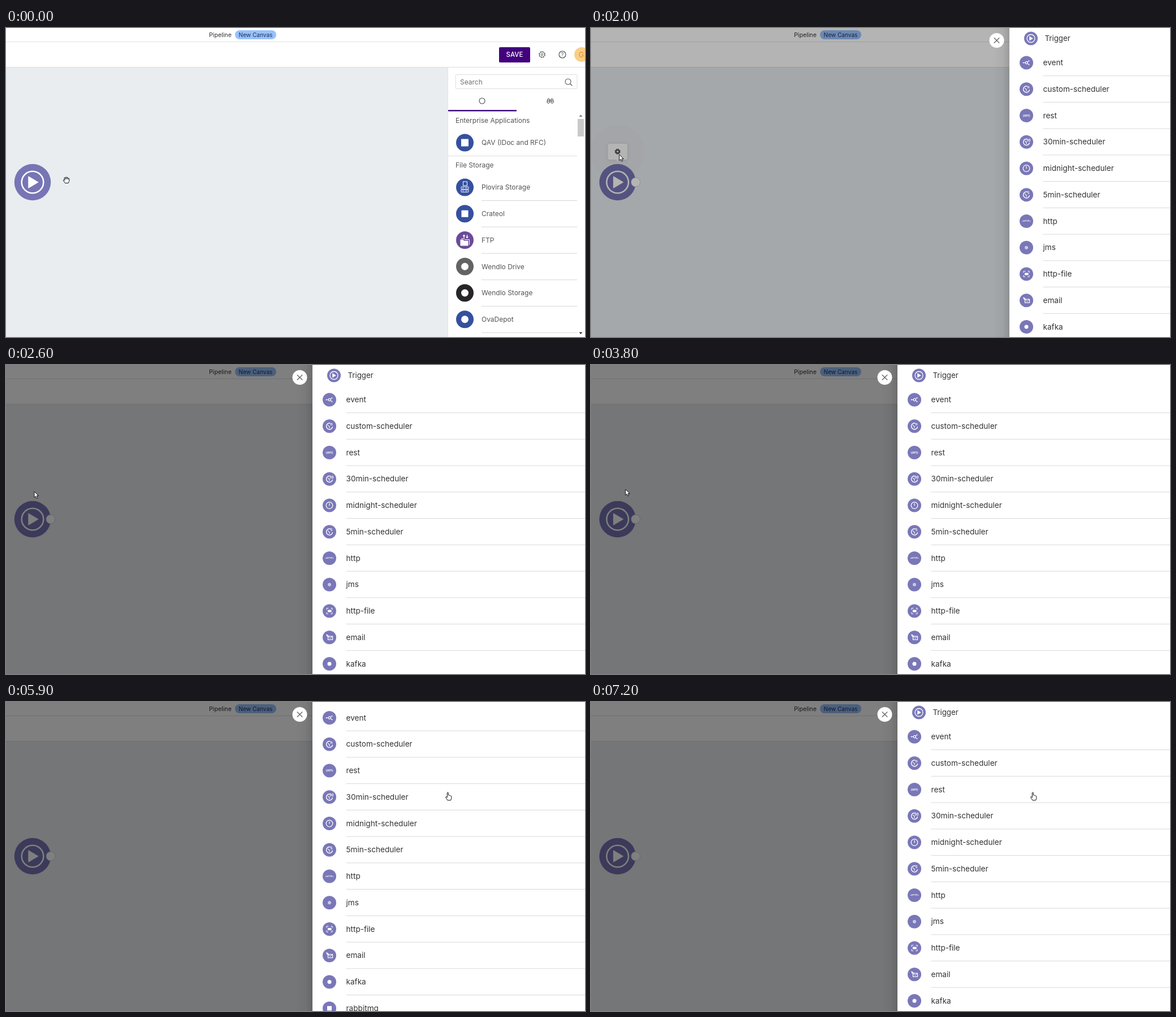
Animation, 1024 px wide and 547 px high, one loop 8 s. Source, as an HTML page:

```html
<!DOCTYPE html>
<html lang="en">
<head>
<meta charset="utf-8">
<title>Pipeline canvas</title>
<style>
  html, body { margin: 0; width: 100%; height: 100%; overflow: hidden; background: #fff; }
  svg { display: block; width: 100%; height: 100%; font-family: Inter, "Open Sans", sans-serif; }
</style>
</head>
<body>
<svg id="stage" viewBox="0 0 1024 547"></svg>
<script>
const LOOP = 8000, STEP = 100, PITCH = 46.75, WIDTH = 1024, DOCK = 542;
const BLUE = '#36509f', VIOLET = '#7a77b8';

const text = (x, y, size, fill, str, extra = '') =>
  `<text x="${x}" y="${y}" font-size="${size}" fill="${fill}" ${extra}>${str}</text>`;
const rect = (x, y, w, h, fill, extra = '') =>
  `<rect x="${x}" y="${y}" width="${w}" height="${h}" fill="${fill}" ${extra}/>`;
const disc = (x, y, r, fill, extra = '') =>
  `<circle cx="${x}" cy="${y}" r="${r}" fill="${fill}" ${extra}/>`;
const line = (d, color = '#fff', w = 1.2) =>
  `<path d="${d}" fill="none" stroke="${color}" stroke-width="${w}" stroke-linecap="round" stroke-linejoin="round"/>`;
const shape = (d, fill = '#fff') => `<path d="${d}" fill="${fill}"/>`;
const group = (x, y, body, id = '') =>
  `<g ${id && `id="${id}"`} transform="translate(${x} ${y})">${body}</g>`;
const center = 'text-anchor="middle"';

function gear(r, color, w) {
  const tooth = 2 * Math.PI * r / 16;
  return disc(0, 0, r * .6, 'none', `stroke="${color}" stroke-width="${w}"`) +
    disc(0, 0, r * .9, 'none', `stroke="${color}" stroke-width="${r * .3}" stroke-dasharray="${tooth * .9}"`);
}

const play = (r, ring) => disc(0, 0, r, 'none', `stroke="#fff" stroke-width="${ring}"`) +
  `<path d="M${-r * .37} ${-r * .52}V${r * .52}L${r * .5} 0Z" fill="#fff" stroke="#fff" stroke-width="${r * .06}" stroke-linejoin="round"/>`;

const clock = label =>
  line('M1 -5.2A5.5 5.5 0 1 0 5.4 1.5', '#fff', 1.4) + line('M-2.6 -1.6L0 .6V3') +
  text(3.7, -1.2, 6, '#fff', label, `${center} font-weight="700"`);
const tiny = (str, size) => text(0, size * .36, size, '#fff', str, `${center} font-weight="700"`);

const storageIcon = rect(-3, -10, 7, 7, 'none', 'stroke="#fff"') +
  [0, 5].map(y => rect(-6.5, y - 1, 13, 4.5, 'none', 'stroke="#fff" rx="1"') + line(`M-4 ${y + 1.2}h2M1 ${y + 1.2}h3`, '#fff', .9)).join('');
const ftpIcon = shape('M-8 -1h5l1.500 2H6V10H-8Z') + line('M-6 -2.5h5l1 1.500H8V8', '#fff', 1) +
  line('M-1.500 -4V-9M-3 -7.500L-1.500 -9L0 -7.500M4 -9V-4M2.500 -5.500L4 -4L5.500 -5.500', '#fff', 1.3);

const apps = [
  ['QAV (IDoc and RFC)', BLUE, rect(-6.5, -6.5, 13, 13, '#fff')],
  ['Plovira Storage', BLUE, storageIcon],
  ['Crateol', BLUE, rect(-6, -6, 12, 12, '#fff')],
  ['FTP', '#6c4a98', ftpIcon],
  ['Wendlo Drive', '#636363', disc(0, 0, 6.5, '#fff')],
  ['Wendlo Storage', '#272528', disc(0, 0, 6.5, '#fff')],
  ['OvaDepot', BLUE, disc(0, 0, 6.5, '#fff')]
];

const triggers = [
  ['event', line('M-6 0H-2M2 -1.300L4.300 -3M2 1.300L4.300 3', '#fff', 1) +
    disc(.3, 0, 2.1, 'none', 'stroke="#fff" stroke-width="1.1"') +
    disc(4.5, -3.2, 1, '#fff') + disc(4.5, 3.2, 1, '#fff') + disc(-5, 0, .9, '#fff')],
  ['custom-scheduler', clock('n')],
  ['rest', tiny('{API}', 5)],
  ['30min-scheduler', clock('30')],
  ['midnight-scheduler', disc(0, 0, 5.8, 'none', 'stroke="#fff" stroke-width="1.3"') + line('M0 -3.500V.5')],
  ['5min-scheduler', clock('5')],
  ['http', tiny('&lt;HTTP&gt;', 3.8)],
  ['jms', disc(0, 0, 3, '#fff', 'opacity=".6"')],
  ['http-file', line('M-5 -2.500V-5H-2M3 -5H5V-2.500M5 2.500V5H2.500M-2.500 5H-5V2.500', '#fff', 1) + rect(-3, -2, 6.5, 4, '#fff')],
  ['email', shape('M-6 -6L-1 -3.500L-3 -2.700L-4 -.5Z') + rect(-2.5, -2, 8, 6, 'none', 'stroke="#fff" stroke-width="1.2"') + line('M-2 -1.500L1.500 1.500L5 -1.500', '#fff', 1)],
  ['kafka', disc(0, 0, 3.5, '#fff')],
  ['rabbitmq', rect(-4, -4, 8, 8, '#fff')]
];

function header() {
  return rect(0, 0, WIDTH, 70, '#fff') + rect(0, 24, WIDTH, 1, '#e2e2e2') + rect(0, 69, WIDTH, 1, '#dcdcdc') +
    text(359, 16, 10.7, '#333', 'Pipeline') +
    rect(405, 4, 73, 16, '#98c1fc', 'rx="8"') + text(441.5, 16, 10.1, '#1f3157', 'New Canvas', center) +
    rect(872, 34, 55, 27, '#43017d', 'rx="2"') + text(899.5, 51.2, 11.5, '#fff', 'SAVE', `${center} font-weight="500"`) +
    group(948, 47, disc(0, 0, 4.6, 'none', 'stroke="#555" stroke-width="1"') + disc(0, 0, 1.8, 'none', 'stroke="#555"') +
      disc(0, 0, 5.3, 'none', 'stroke="#555" stroke-width="1.2" stroke-dasharray="2.08"')) +
    disc(984, 47, 6, 'none', 'stroke="#444" stroke-width="1.1"') + text(984, 50.4, 9, '#444', '?', center) +
    disc(1018, 47, 13, '#f9cf87') + text(1017.5, 51.5, 12.5, '#e08a2c', 'G', center);
}

function sidebar() {
  const row = ([name, color, icon], y) =>
    group(811.5, y, disc(0, 0, 15.5, color) + icon) + text(841, y + 4.3, 12, '#555', name);
  const files = apps.slice(1).map((app, i) => {
    const y = 282 + i * PITCH;
    return row(app, y) + rect(841, y + 23, 169, 1, '#d6d6d6');
  }).join('');
  return rect(781, 70, 243, 477, '#fff') + rect(781, 70, 1, 477, '#e4e6e8') +
    rect(795, 82.5, 215, 25, '#fff', 'stroke="#dedede" rx="2"') + text(803, 99.6, 12, '#707070', 'Search') +
    line('M998 99L1001 102', '#555', 1.1) + disc(994, 95, 5, 'none', 'stroke="#555" stroke-width="1.1"') +
    disc(842, 129, 5, 'none', 'stroke="#444" stroke-width="1.1"') +
    disc(959.2, 131, 2.2, 'none', 'stroke="#444"') + disc(965.8, 131, 2.2, 'none', 'stroke="#444"') +
    line('M957 130.500L958 125.500H961V131M968 130.500L967 125.500H964V131M961 128H964', '#444', 1) +
    rect(782, 145, 121, 2.5, '#3f0c7a') +
    text(795, 168, 12, '#555', 'Enterprise Applications') + row(apps[0], 203) +
    rect(782, 226, 228, 1, '#dedede') + text(795, 247.3, 12, '#555', 'File Storage') + files +
    rect(1011, 161, 11, 31, '#c9c9c9') +
    shape('M1013.500 157L1016.500 153.500L1019.500 157Z', '#777') + shape('M1013.500 538.500L1016.500 542L1019.500 538.500Z', '#333');
}

function node() {
  return disc(47, 219, 35, '#000', 'id="ripple"') +
    group(47, 273, disc(0, 0, 32.3, '#7775b5') + play(19.3, 2.6)) +
    disc(79, 273, 8, '#fff', 'id="port" stroke="#c8c8cc" stroke-width=".8"') +
    `<g id="popup"><path d="M43 232L47 237.500L51 232Z" fill="#fff"/>` +
    rect(30, 205, 34, 28, '#fff', 'rx="3" filter="url(#soft)"') +
    disc(47, 219, 9.7, '#e6e6e6', 'id="hover"') + group(47, 218.7, gear(4.9, '#555', 2.7)) + '</g>';
}

function panel() {
  const rows = triggers.map(([name, icon], i) => {
    const y = 61.5 + i * PITCH;
    return group(30, y, disc(0, 0, 12, VIOLET) + icon) + text(59.5, y + 4.7, 13.6, '#333', name) +
      rect(59.5, y + 22.6, 430, 1, '#d9d9d9');
  }).join('');
  const list = group(38, 18.5, disc(0, 0, 12, VIOLET) + play(7, 1.3)) + text(62.5, 23.3, 13.3, '#333', 'Trigger') + rows;
  return rect(-30, 0, 30, 547, 'url(#edge)') + rect(0, 0, 490, 547, '#fff') + group(0, 0, list, 'list') +
    group(-22.5, 22, disc(0, 0, 13, '#fff') + line('M-4.300 -4.300L4.300 4.300M4.300 -4.300L-4.300 4.300', '#666', 1.3));
}

const outlined = d => `<path d="${d}" fill="#fff" stroke="#111" stroke-width="1" stroke-linejoin="round"/>`;
const cursors = {
  grab: outlined('M3.500 11.500L.5 7Q0 5.500 1.500 5.500L3 7L2 2.500Q2.500 1 3.700 2L4.500 4.500V1.300Q5.500 0 6.500 1.300V4.500L7.200 1.800Q8.500 1 9 2.300V5L9.700 3.500Q11 3 11 4.500L10.500 8.500L9.200 11.500Z'),
  arrow: outlined('M0 0V10.500L2.500 8.300L4.200 12L6 11.200L4.400 7.600H7.600Z'),
  point: outlined('M4 15L1 10.500Q0 8.500 1.500 8.500L3.300 10V1.500Q4.300 0 5.300 1.500V6Q6.500 5.300 7.300 6.500Q8.700 6 9.200 7.200Q10.800 7 10.800 8.500V11.500L9.500 15Z')
};

const stage = document.getElementById('stage');
stage.innerHTML = `<defs>
  <filter id="soft" x="-50%" y="-50%" width="200%" height="200%"><feDropShadow dx="0" dy="1" stdDeviation="3" flood-opacity=".1"/></filter>
  <linearGradient id="edge"><stop stop-opacity="0"/><stop offset=".6" stop-opacity=".04"/><stop offset="1" stop-opacity=".14"/></linearGradient>
  </defs>` + rect(0, 0, WIDTH, 547, '#e9edf0') + node() + header() + sidebar() +
  rect(0, 0, WIDTH, 547, '#000', 'id="shade"') + group(0, 0, panel(), 'panel') +
  group(0, 0, Object.entries(cursors).map(([k, body]) => group(0, 0, body, k)).join(''), 'cursor');

const $ = id => document.getElementById(id);
const set = (id, attrs) => { for (const k in attrs) $(id).setAttribute(k, attrs[k]); };
const move = (id, x, y) => set(id, { transform: `translate(${x} ${y})` });

// Last value whose time has come.
const held = (track, t) => track.reduce((v, [at, value]) => t >= at ? value : v, 0);

const path = [
  [0, 101, 263], [200, 84, 260], [300, 66, 253], [500, 47, 238], [600, 47, 238], [1200, 50, 224],
  [3700, 50, 224], [3800, 61, 220], [4000, 190, 165], [4200, 420, 104], [4300, 550, 95],
  [4400, 655, 112], [4500, 718, 135], [4600, 718, 135], [4800, 777, 159], [LOOP, 777, 159]
];
function pointer(t) {
  const i = path.findIndex(p => p[0] > t);
  const [t0, x0, y0] = path[i - 1], [t1, x1, y1] = path[i];
  const k = (t - t0) / (t1 - t0);
  return [x0 + (x1 - x0) * k, y0 + (y1 - y0) * k];
}

const slide = [[0, 1100], [2000, 740], [2100, 575], [2200, DOCK]];
const scroll = [[5900, 33.5], [6000, 49], [6100, 52], [6800, 44], [6900, 27], [7000, 11], [7100, 3], [7200, 0]];
const popup = [[300, 1], [2500, .5], [2600, 0]];
const ripple = [[1200, 35], [2000, 48], [2100, 59], [2200, 0]];

function draw(now) {
  const t = Math.floor(now % LOOP / STEP) * STEP;
  const [x, y] = pointer(t);
  const kind = t < 300 ? 'grab' : x < DOCK ? 'arrow' : 'point';
  const left = held(slide, t);
  move('cursor', x, y);
  for (const k in cursors) set(k, { visibility: k === kind ? 'visible' : 'hidden' });
  set('port', { opacity: t >= 300 ? 1 : 0 });
  set('popup', { opacity: held(popup, t) });
  set('hover', { opacity: t >= 900 && t < 2000 ? 1 : 0 });
  set('ripple', { r: held(ripple, t), opacity: t < 2000 ? .025 : .012 });
  // The backdrop darkens as the panel comes in.
  set('shade', { opacity: .5 * Math.max(0, WIDTH - left) / (WIDTH - DOCK) });
  move('panel', left, 0);
  move('list', 0, -held(scroll, t));
}

const start = performance.now();
function tick() {
  draw(performance.now() - start);
  requestAnimationFrame(tick);
}
tick();
</script>
</body>
</html>
```
